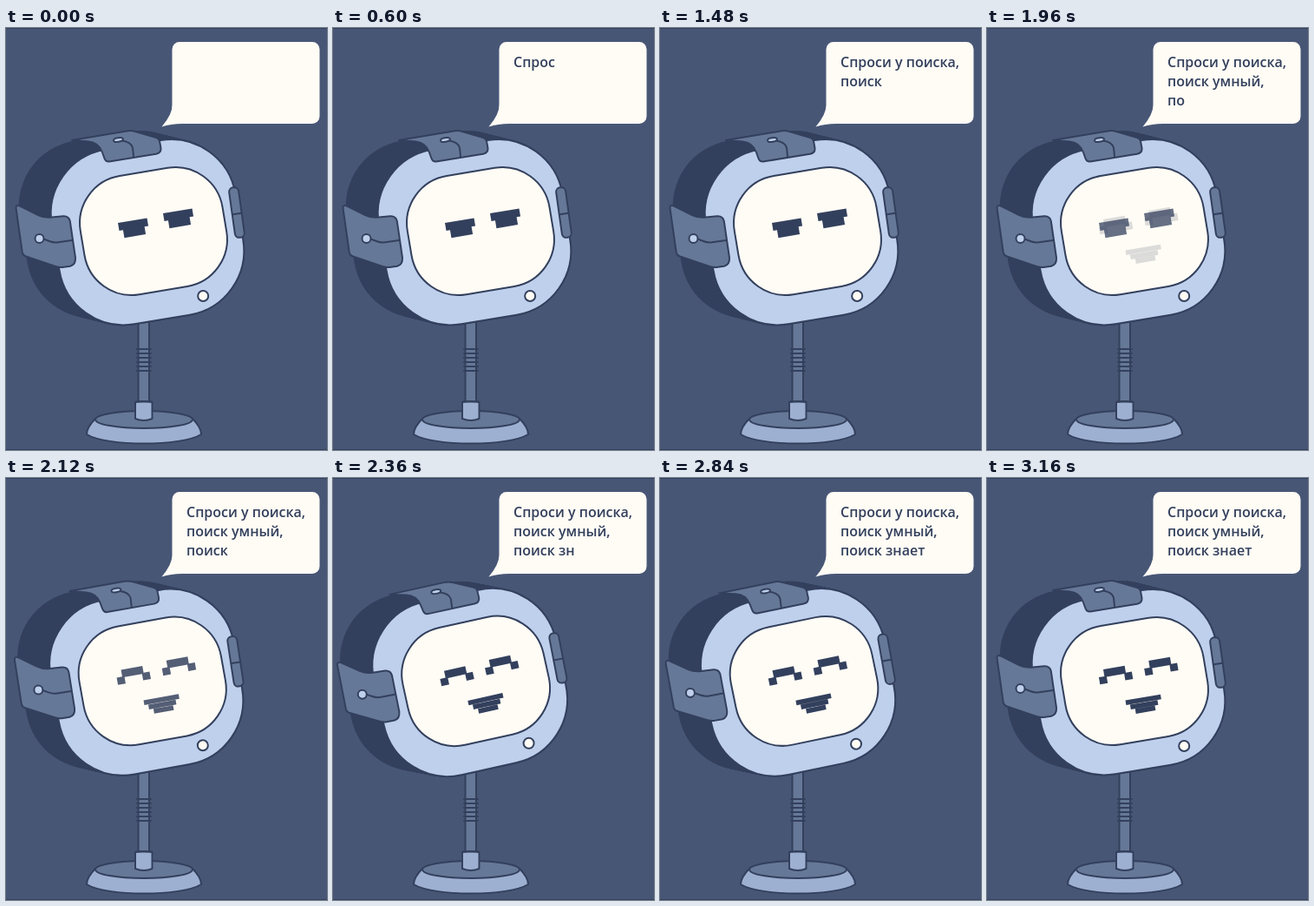
Recreate the animation shown at these times as an HTML page. Size 370x485 px, loop 4.8 s.

```html
<!DOCTYPE html>
<html lang="ru">
<head>
<meta charset="utf-8">
<style>
  html, body { margin: 0; width: 100%; height: 100%; overflow: hidden; background: #485676; }
  svg { display: block; width: 370px; height: 485px; }
  .line { stroke: #33405d; stroke-width: 2; stroke-linejoin: round; stroke-linecap: round; }
  .none { fill: none; }
  .dark { fill: #33405d; }
  .mid { fill: #667897; }
  .soft { fill: #9db0d2; }
  .light { fill: #bfd0ec; }
  .cream { fill: #fffcf5; }
  text { font: 600 16px "Open Sans", "Noto Sans", sans-serif; fill: #33405d; white-space: pre; }
</style>
</head>
<body>
<svg viewBox="0 0 370 485">
  <path class="dark" d="M0 0h370v1H0zM0 484h370v1H0z"/>

  <!-- speech bubble -->
  <path class="cream" d="M200 16H353a8.500 8.500 0 0 1 8.500 8.500V101.500a8.500 8.500 0 0 1-8.500 8.500H203Q190 110 179.500 113.500Q192 99 191.500 88V24.500a8.500 8.500 0 0 1 8.500-8.500z"/>
  <text x="208" y="45"></text>
  <text x="208" y="67"></text>
  <text x="208" y="89"></text>

  <!-- stand -->
  <g class="line">
    <path class="soft" d="M103 449C96 456 93 461 93 467C115 481 203 481 225 467C225 461 222 456 215 449z"/>
    <ellipse class="mid" cx="159" cy="450" rx="56" ry="10"/>
    <path class="mid" d="M152.500 332V430H165V332z"/>
    <path class="none" d="M151 369h16m-16 5h16m-16 5h16m-16 5h16m-16 5h16m-16 5h16"/>
    <path class="soft" d="M149 430V449Q159 453 168.500 449V430Q159 428 149 430z"/>
    <path class="none" d="M150 429.500h18"/>
  </g>

  <g id="head">
    <g id="body" class="dark"></g>
    <g class="line">
      <rect class="light" x="55.700" y="133" width="214.600" height="203.400" rx="75" transform="rotate(-9.500 163 234.700)"/>
      <rect class="cream" x="87" y="164.500" width="166" height="138" rx="55" transform="rotate(-9.500 170 233.500)"/>
      <circle class="cream" cx="227.200" cy="308" r="6"/>

      <path class="mid" d="M76 129L139 118.500Q144 117.500 149 119L173 126Q176.500 127 177 130L178.500 138Q179 143.500 173 144.700L119 153.500Q115 154 113.500 150L111 143Q107 131.500 95 130.500z"/>
      <path class="none" d="M134 129.500Q144 131 146 137.500L147 147.500"/>
      <ellipse class="light" cx="129.500" cy="128.500" rx="5.500" ry="2.300" transform="rotate(-8 129.500 128.500)"/>

      <path class="mid" d="M11.500 207Q11.500 202.500 16 204.500L37 215Q43 218 50 217.800L66 216.300Q72.500 216 73.800 222L80 264Q80.500 272 74 273.700L65 275Q61 275.300 57 274L23 262.500Q19.500 261.500 18.800 258z"/>
      <path class="none" d="M43.500 242.500L50 245Q55 247 60 246.300L76 244"/>
      <circle class="light" cx="38.500" cy="242" r="5"/>

      <g transform="rotate(-8 266 212)">
        <rect class="mid" x="260.500" y="183" width="11" height="58" rx="5"/>
        <path class="none" d="M261 213.500h10"/>
      </g>
    </g>

    <g id="closed" class="dark">
      <path transform="translate(129 224) rotate(-9.500)" d="M0 0h34v9.200h-4.500v9h-25v-9H0z"/>
      <path transform="translate(181 213) rotate(-9.500)" d="M0 0h34v9.200h-4.500v9h-25v-9H0z"/>
    </g>
    <g id="smile" class="dark">
      <path transform="translate(134 220) rotate(-9.500)" d="M0 0h25v8h7v8.500h-9v-7.500h-20.500v7.500h-9v-8.500H0z"/>
      <path transform="translate(186.300 210) rotate(-9.500)" d="M0 0h25v8h7v8.500h-9v-7.500h-20.500v7.500h-9v-8.500H0z"/>
      <path transform="translate(159.500 255.500) rotate(-9.500)" d="M0 0h41v5.600H0zM4.500 5.800h32v5.600h-32zM9.500 11.600h23v5.600h-23z"/>
    </g>
  </g>
</svg>
<script>
const LOOP = 4800, STEP = 40;
const PHRASE = "Спроси у поиска,\nпоиск умный,\nпоиск знает";
const $ = id => document.getElementById(id);
const lines = document.querySelectorAll("text");
const head = $("head"), closed = $("closed"), smile = $("smile");

const ramp = (t, from, to) => Math.min(1, Math.max(0, (t - from) / (to - from)));
const ease = x => x * x * (3 - 2 * x);

// Depth of the casing: the face outline swept back and to the left.
for (let i = 0; i <= 18; i++) {
  $("body").insertAdjacentHTML("beforeend",
    `<rect x="54.7" y="132" width="216.6" height="205.4" rx="76"
      transform="translate(${-2 * i} ${-i / 2}) rotate(-9.5 163 234.7)"/>`);
}

function draw(t) {
  const shown = Math.round(PHRASE.length * ease(ramp(t, 0, 2800)));
  const typed = PHRASE.slice(0, shown).split("\n");
  lines.forEach((line, i) => line.textContent = typed[i] || "");

  const blink = 1 - ramp(t, 600, 880) + ramp(t, 880, 1160);
  closed.setAttribute("opacity", blink * (1 - ramp(t, 1920, 2080)));
  smile.setAttribute("opacity", ramp(t, 1920, 2160));

  const tilt = 4 * (ease(ramp(t, 1960, 2560)) - ease(ramp(t, 2560, 3160)));
  head.setAttribute("transform", `rotate(${-tilt} 165 337)`);
}

const start = performance.now();
function tick() {
  const t = (performance.now() - start) % LOOP;
  draw(Math.floor(t / STEP) * STEP);
  requestAnimationFrame(tick);
}
tick();
</script>
</body>
</html>
```
